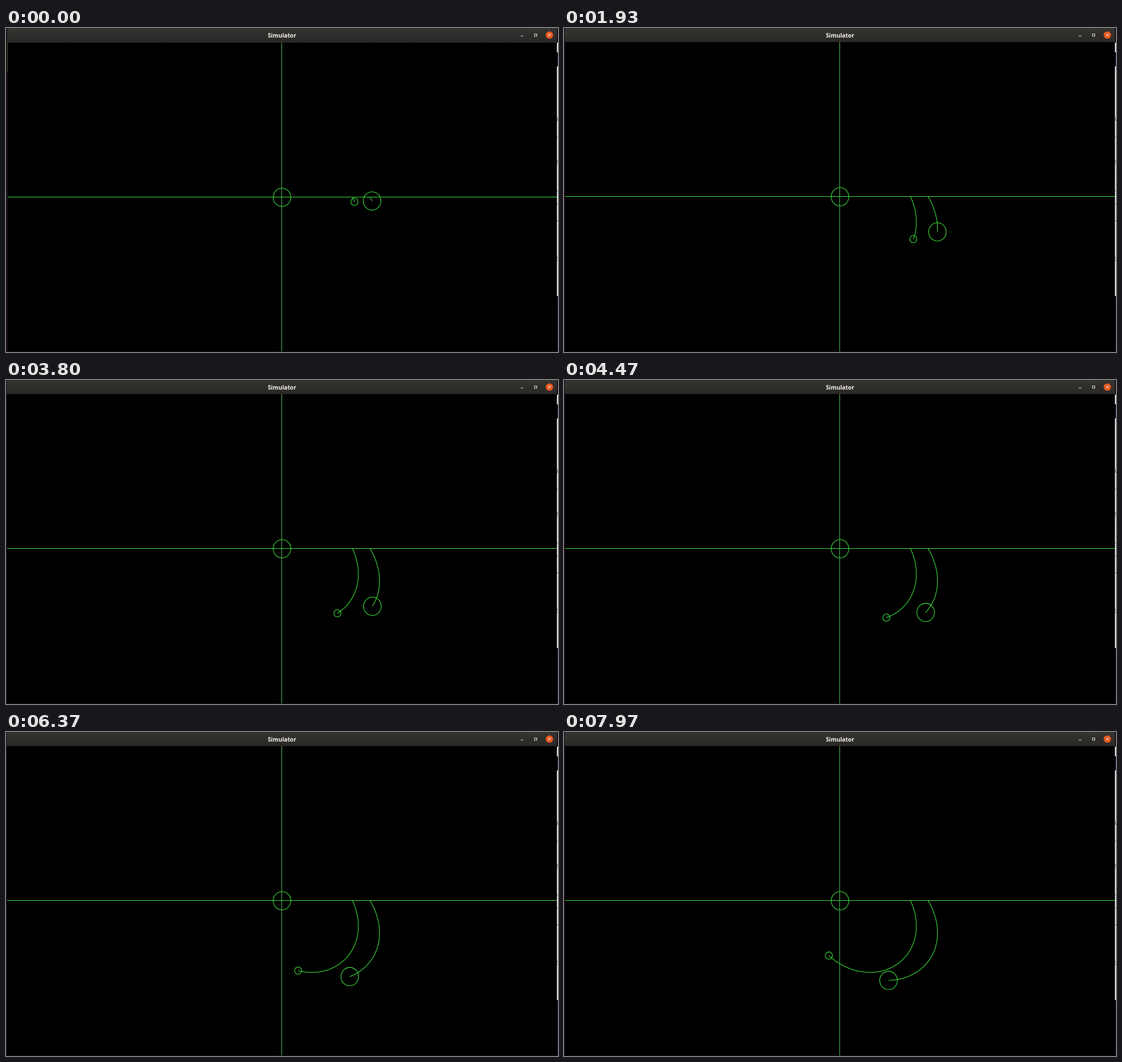
Animation of 976x574 px, one loop 8000 ms. Source, as an HTML page with a canvas:

```html
<!DOCTYPE html>
<html lang="en">
<head>
<meta charset="utf-8">
<title>Simulator</title>
<style>
  html, body { margin: 0; width: 100%; height: 100%; overflow: hidden; background: #000; }
  canvas { display: block; }
</style>
</head>
<body>
<canvas id="stage" width="976" height="574"></canvas>
<script>
const ctx = document.getElementById('stage').getContext('2d');
const LOOP = 8000, FRAMES_PER_MS = 0.03;

// The star sits at the focus of both orbits; UNIT is its radius in pixels.
const STAR = { x: 488, y: 299 }, UNIT = 15.57, Y_STRETCH = 1 / 0.96;
const ORBIT_PARAMETER = 4.81 * UNIT, OUTWARD_DRIFT = 0.302;
const GREEN = '#3be23b', PALE_GREEN = '#4cc458', ICON = '#e4e2df';

function rect(color, x, y, w, h) {
  ctx.fillStyle = color;
  ctx.fillRect(x, y, w, h);
}

function ring(x, y, radius) {
  ctx.beginPath();
  ctx.ellipse(x, y, radius, radius * Y_STRETCH, 0, 0, 2 * Math.PI);
  ctx.stroke();
}

// Area swept by each orbit; the simulation slows down as the trails grow.
function sweptArea(seconds) {
  const stepCost = 2.055e-4, trailCost = 1.8e-9, initial = 965;
  const root = Math.sqrt(stepCost ** 2 + 4 * trailCost * seconds);
  return initial + (root - stepCost) / (2 * trailCost);
}

// Kepler orbit: radius follows the conic, angle follows equal areas.
function drawBody(startDistance, radius, area) {
  const orbitRadius = angle => ORBIT_PARAMETER /
    (1 + (ORBIT_PARAMETER / startDistance - 1) * Math.cos(angle) - OUTWARD_DRIFT * Math.sin(angle));
  const steps = Math.ceil(area / 80), stepArea = area / steps;
  let angle = 0, x, y;
  ctx.beginPath();
  for (let i = 0; i <= steps; i++) {
    const r = orbitRadius(angle);
    x = STAR.x + r * Math.cos(angle);
    y = STAR.y + r * Math.sin(angle) * Y_STRETCH;
    ctx.lineTo(x, y);
    angle += stepArea / orbitRadius(angle + stepArea / r ** 2 / 2) ** 2;
  }
  ctx.stroke();
  ring(x, y, radius);
}

// Slivers of the windows behind, including cut-off letters of a text.
function drawDesktop(settled) {
  rect('#1b1019', 0, 0, 976, 574);
  rect('#d8d8d6', 974, 26, 2, 449);
  rect('#17122a', 974, 43, 2, 25);
  rect('#0d0a1c', 974, 475, 2, 99);
  ctx.fillStyle = '#333';
  ctx.font = '11px "Noto Sans", sans-serif';
  ctx.textAlign = 'left';
  [...'s    u       a .      n  u     n  i       o'].forEach((letter, i) =>
    ctx.fillText(letter, 972, 164 + 5.9 * i));
  if (!settled) rect('#4a4a2c', 2, 26, 1, 51);
}

function drawTitleBar(left, height) {
  const shade = ctx.createLinearGradient(0, 0, 0, height);
  shade.addColorStop(0, '#373532');
  shade.addColorStop(1, '#2a2826');
  ctx.fillStyle = shade;
  ctx.beginPath();
  ctx.roundRect(left - 1, 0, 975 - left, height, [4, 4, 0, 0]);
  ctx.fill();

  ctx.fillStyle = '#f4f2ef';
  ctx.font = 'bold 10.2px "Noto Sans", "Open Sans", sans-serif';
  ctx.textAlign = 'center';
  ctx.fillText('Simulator', 488, 16.6);

  ctx.lineWidth = 1;
  ctx.strokeStyle = ICON;
  rect(ICON, 910, 13.5, 5, 1);
  ctx.strokeRect(934.5, 10.5, 4, 4);
  ctx.fillStyle = '#e4551f';
  ctx.beginPath();
  ctx.arc(960.8, 12.5, 6.6, 0, 2 * Math.PI);
  ctx.fill();
  ctx.strokeStyle = '#fff';
  ctx.beginPath();
  ctx.moveTo(958.3, 10); ctx.lineTo(963.3, 15);
  ctx.moveTo(963.3, 10); ctx.lineTo(958.3, 15);
  ctx.stroke();
}

function drawScene(left, top, seconds) {
  rect('#000', left, top, 974 - left, 573 - top);
  rect(PALE_GREEN, 487, top, 1, 573 - top);
  ctx.save();
  ctx.translate(0, top - 25);
  rect(GREEN, left, 298, 974 - left, 1);
  ctx.strokeStyle = GREEN;
  ctx.lineWidth = 1.1;
  ring(STAR.x, STAR.y, UNIT);
  const area = sweptArea(seconds);
  drawBody(10 * UNIT, UNIT, area);
  drawBody(8 * UNIT, 0.4 * UNIT, area);
  ctx.restore();
}

function draw(now) {
  const step = Math.floor((now % LOOP) * FRAMES_PER_MS + 0.15);
  const settled = step > 0;   // the window nudges into place after one step
  const left = settled ? 2 : 3, top = settled ? 25 : 26;
  drawDesktop(settled);
  drawScene(left, top, step / 30);
  drawTitleBar(left, top);
}

const start = performance.now();
function tick() {
  draw(performance.now() - start);
  requestAnimationFrame(tick);
}
tick();
</script>
</body>
</html>
```
